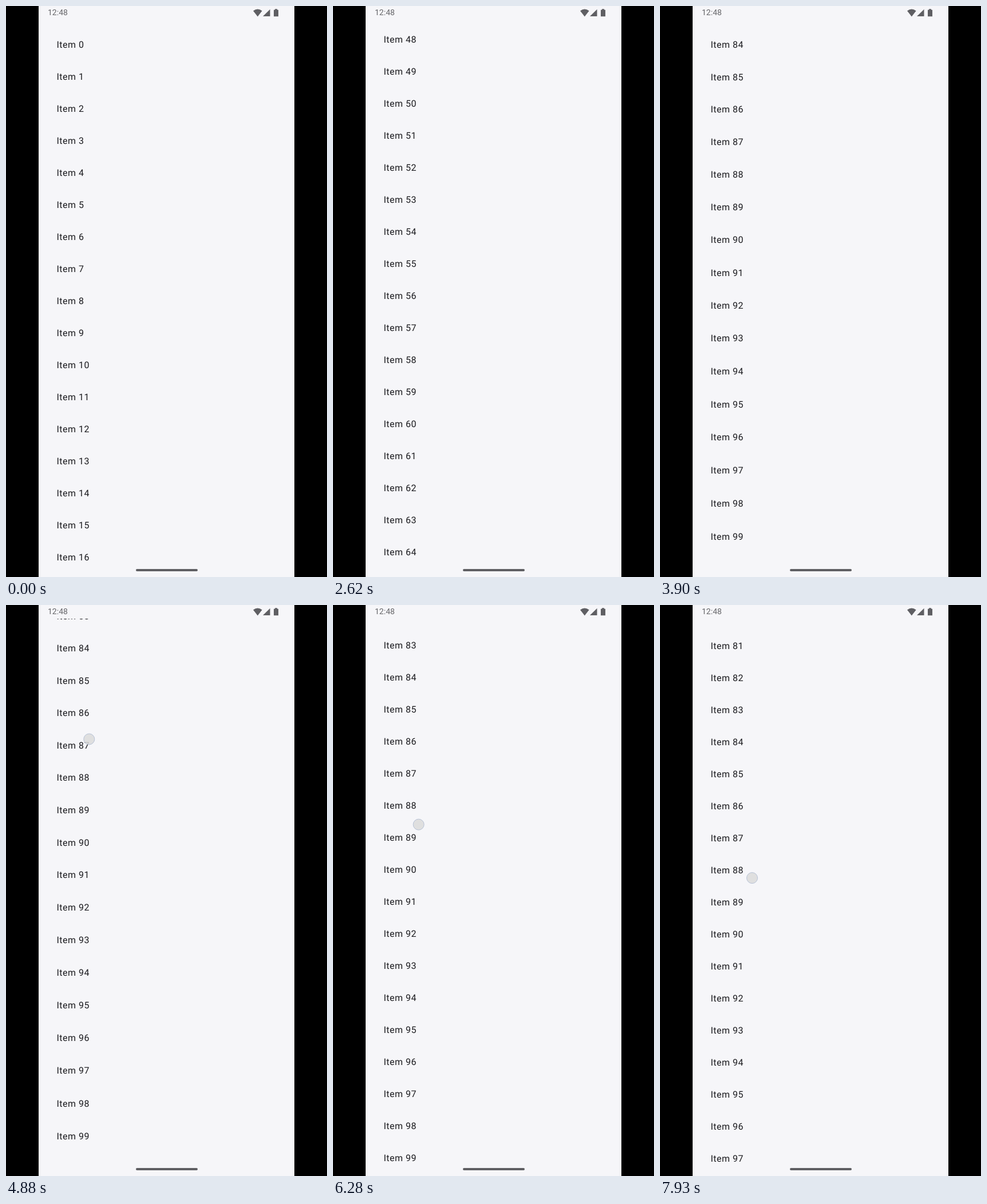
Write an HTML page that moves like this. It is 561x998 px and loops after 8000 ms.

```html
<!DOCTYPE html>
<html lang="en">
<head>
<meta charset="utf-8">
<title>List overscroll</title>
<style>
html, body { margin: 0; width: 100%; height: 100%; overflow: hidden; background: #000; }
#phone { position: absolute; left: 57px; top: 0; width: 447px; height: 998px; background: #f6f6f9; overflow: hidden; font-family: Roboto, sans-serif; text-rendering: geometricPrecision; }
#list { position: absolute; left: 0; top: 24px; width: 447px; height: 950px; overflow: hidden; }
#list div { position: absolute; left: 31.5px; top: -36px; font-size: 16px; line-height: 24px; letter-spacing: .5px; color: #1b1b1f; white-space: nowrap; }
#clock { position: absolute; left: 16px; top: 4px; font-size: 14px; line-height: 16px; color: #66666a; }
#icons { position: absolute; left: 375px; top: 4px; }
#home { position: absolute; left: 169.5px; top: 984px; width: 108px; height: 4px; border-radius: 2px; background: #5f5f63; }
#finger { position: absolute; left: -10px; top: -10px; width: 20px; height: 20px; box-sizing: border-box; border: 1.5px solid #b7c2d6; border-radius: 50%; background: #dadbdad9; }
</style>
</head>
<body>
<div id="phone">
  <div id="list"></div>
  <div id="clock">12:48</div>
  <svg id="icons" width="46" height="16" fill="#5f5f63">
    <path d="M0 4.6Q7.8 -1.4 15.6 4.6L7.8 14.4Z"/>
    <path d="M29.5 1.8V14H17Z"/>
    <path d="M36 2.7h2V1.2h4v1.5h2v11.6h-8z"/>
  </svg>
  <div id="home"></div>
</div>
<div id="finger"></div>
<script>
const LOOP = 8000, ROW = 56, FIRST = 68, END = 4682, BOTTOM = 974, VIEW = 950;
const list = document.getElementById('list');
const finger = document.getElementById('finger');
const rows = Array.from({ length: 100 }, (_, i) => {
  const row = document.createElement('div');
  row.textContent = 'Item ' + i;
  return list.appendChild(row);
});

const linear = k => k;
const sine = k => (1 - Math.cos(Math.PI * k)) / 2;

// A touch passes through points of [time, x, y].
function touch(ease, ...points) {
  const start = points[0][0], end = points[points.length - 1][0];
  const at = t => {
    t = Math.min(end, Math.max(start, t));
    const i = Math.max(1, points.findIndex(p => p[0] >= t));
    const [t0, x0, y0] = points[i - 1], [t1, x1, y1] = points[i];
    const k = ease((t - t0) / (t1 - t0));
    return { x: x0 + (x1 - x0) * k, y: y0 + (y1 - y0) * k };
  };
  return { start, end, at, moved: t => points[0][2] - at(t).y };
}

const flick = touch(linear, [1900, 200, 851], [2045, 204, 204]);
const push = touch(linear, [3540, 176, 700], [3740, 179, 360]);
const pull = touch(sine, [4460, 143, 347], [5230, 147, 150], [5830, 144, 340],
  [6900, 159, 456], [7690, 164, 497]);
const lift = touch(sine, [7690, 164, 497], [7930, 161, 477]);
const touches = [flick, push, pull, lift];

// The picture holds for 100 ms, then updates at 20 ms, in a 140 ms rhythm.
function step(t) {
  const phase = (t + 20) % 140;
  return t - (phase < 100 ? phase : phase % 20);
}

function fling(t) {
  const k = Math.min(Math.max(0, t - flick.end), push.start - flick.end) / 1950;
  return 3650 * (1 - Math.pow(1 - k, 2.36));
}

function scrollAt(t) {
  const coast = Math.max(0, t - push.end) * 2.3;
  const pos = flick.moved(t) + fling(t) + push.moved(t) + coast;
  return Math.min(END, pos) + Math.min(0, pull.moved(t));
}

// Impact spring at the end of the list, then the stretch under the finger.
function stretchAt(t) {
  const k = Math.max(0, t - 3840) * .017;
  return 38 * k * Math.exp(1 - k) + 45 * (1 - Math.exp(-Math.max(0, pull.moved(t)) / 150));
}

function draw(now) {
  const t = step(now % LOOP);
  const scroll = Math.round(scrollAt(t)), stretch = stretchAt(t);
  rows.forEach((row, i) => {
    const rest = FIRST + ROW * i - scroll;
    const u = (BOTTOM - rest) / VIEW;
    const y = rest - stretch * (u - .41 * u * u);
    const seen = y > 0 && y < 1000;
    row.style.display = seen ? '' : 'none';
    if (seen) row.style.transform = `translateY(${y.toFixed(2)}px)`;
  });
  const active = touches.find(p => t >= p.start && t < p.end);
  finger.style.display = active ? '' : 'none';
  if (active) {
    const { x, y } = active.at(t);
    finger.style.transform = `translate(${x}px, ${y}px)`;
  }
}

let start;
function tick(now) {
  start ??= now;
  draw(Math.max(0, now - start));
  requestAnimationFrame(tick);
}
draw(0);
requestAnimationFrame(tick);
</script>
</body>
</html>
```
